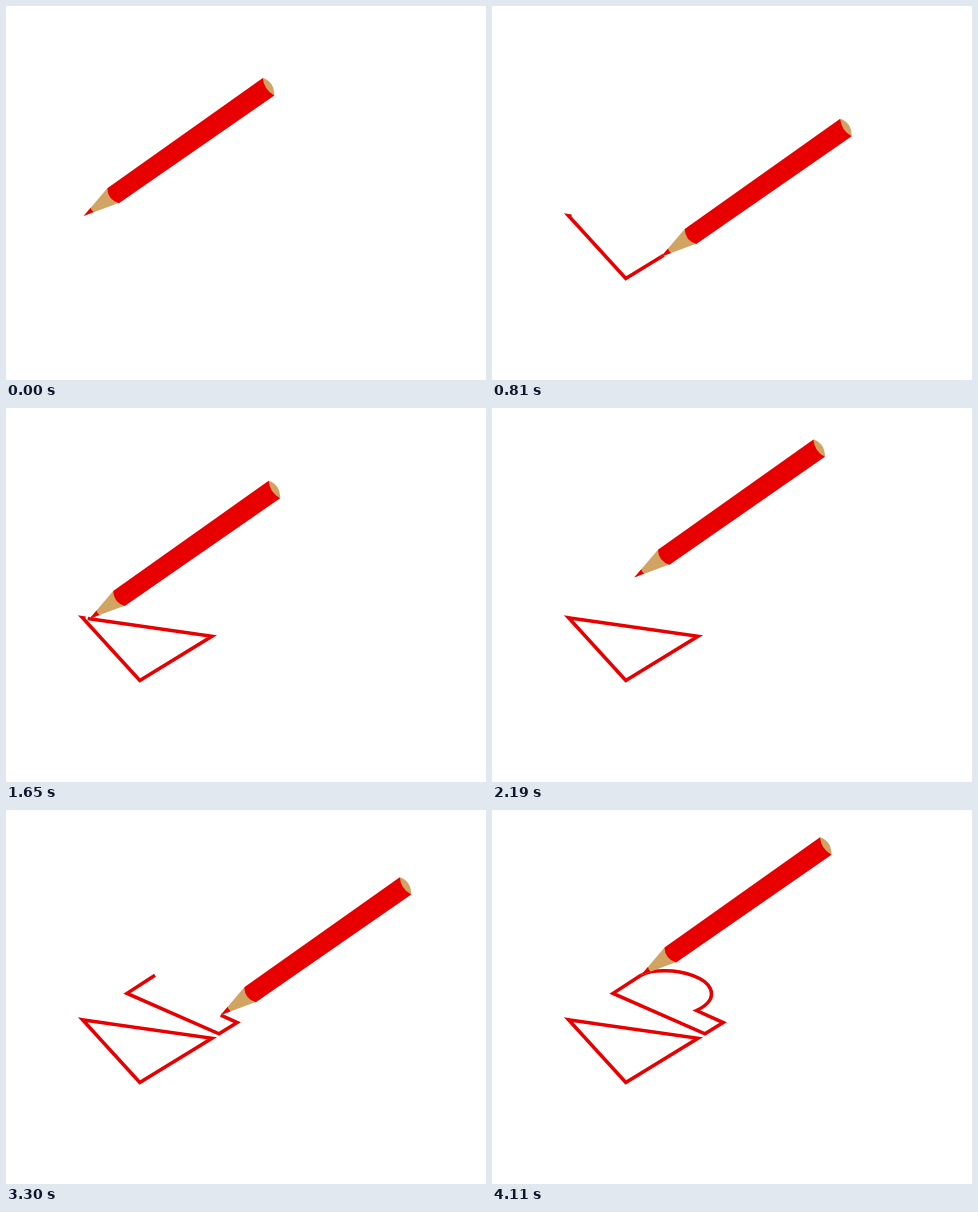
Animation, 480 px wide and 374 px high, one loop 4170 ms. Source, as an HTML page:

```html
<!DOCTYPE html>
<html lang="en">
<head>
<meta charset="utf-8">
<title>Drawing pencil</title>
<style>
  html, body { margin: 0; width: 100%; height: 100%; overflow: hidden; background: #fff; }
  svg { display: block; width: 100%; height: 100%; }
  .line { fill: none; stroke: #e80000; stroke-width: 3.5; stroke-miterlimit: 10; }
  .red { fill: #e80000; }
  .wood { fill: #d2a464; }
</style>
</head>
<body>
<svg viewBox="0 0 480 374">
  <path id="triangle" class="line" stroke-linecap="square"
    d="M77.8 210 L76.5 209.8 L133.8 272.5 L206 228.3 L77.8 210"/>
  <path id="arch" class="line"
    d="M149 165.3 L121 183.4 L213 223.8 L231.2 212.6 L204.5 200.5
       C216 195 222 188 218.5 179 C214 168 192 160.5 172 160.8 C163 160.8 157 161 149 165.3"/>
  <!-- The pencil's tip sits at the group's origin -->
  <g id="pencil">
    <g transform="translate(-77.5 -209.8)">
      <path class="wood" d="M77.3 209.8 L101 182 L113 196.5 Z"/>
      <path class="red" d="M77.3 209.8 L84.4 201.5 Q85 204.5 87.4 205.9 Z"/>
      <path class="red" d="M256.5 71.8 L101 182 Q101.5 193.5 112.6 197 L268 89.2 Z"/>
      <path class="wood" d="M256.5 71.8 Q268 75.5 268 89.2 Q257.5 83.5 256.5 71.8 Z"/>
    </g>
  </g>
</svg>
<script>
const FRAME = 30, LOOP = 4170, LAST = 137;
const DRAW = 60, TRAVEL = 16;

const triangle = document.getElementById('triangle');
const arch = document.getElementById('arch');
const pencil = document.getElementById('pencil');
const triangleLength = triangle.getTotalLength();
const archLength = arch.getTotalLength();

function ease(x) {
  const t = Math.min(1, Math.max(0, x));
  return t * t * (3 - 2 * t);
}

function reveal(path, length) {
  path.style.visibility = length > 0 ? 'visible' : 'hidden';
  path.setAttribute('stroke-dasharray', `${length} 999`);
}

function render(ms) {
  const frame = Math.min(LAST, Math.floor((ms % LOOP) / FRAME));
  const first = ease(frame / DRAW);
  const travel = ease((frame - DRAW) / TRAVEL);
  const second = ease((frame - DRAW - TRAVEL) / DRAW);

  // The first line runs slightly ahead of the tip midway
  const lead = 12 * first * first * (1 - first);
  reveal(triangle, first * triangleLength + lead);
  reveal(arch, second * archLength);

  const from = triangle.getPointAtLength(first * triangleLength);
  const to = arch.getPointAtLength(second * archLength);
  const x = from.x + (to.x - from.x) * travel;
  const y = from.y + (to.y - from.y) * travel;
  pencil.setAttribute('transform', `translate(${x} ${y})`);
}

const start = performance.now();
function tick() {
  render(performance.now() - start);
  requestAnimationFrame(tick);
}
tick();
</script>
</body>
</html>
```
